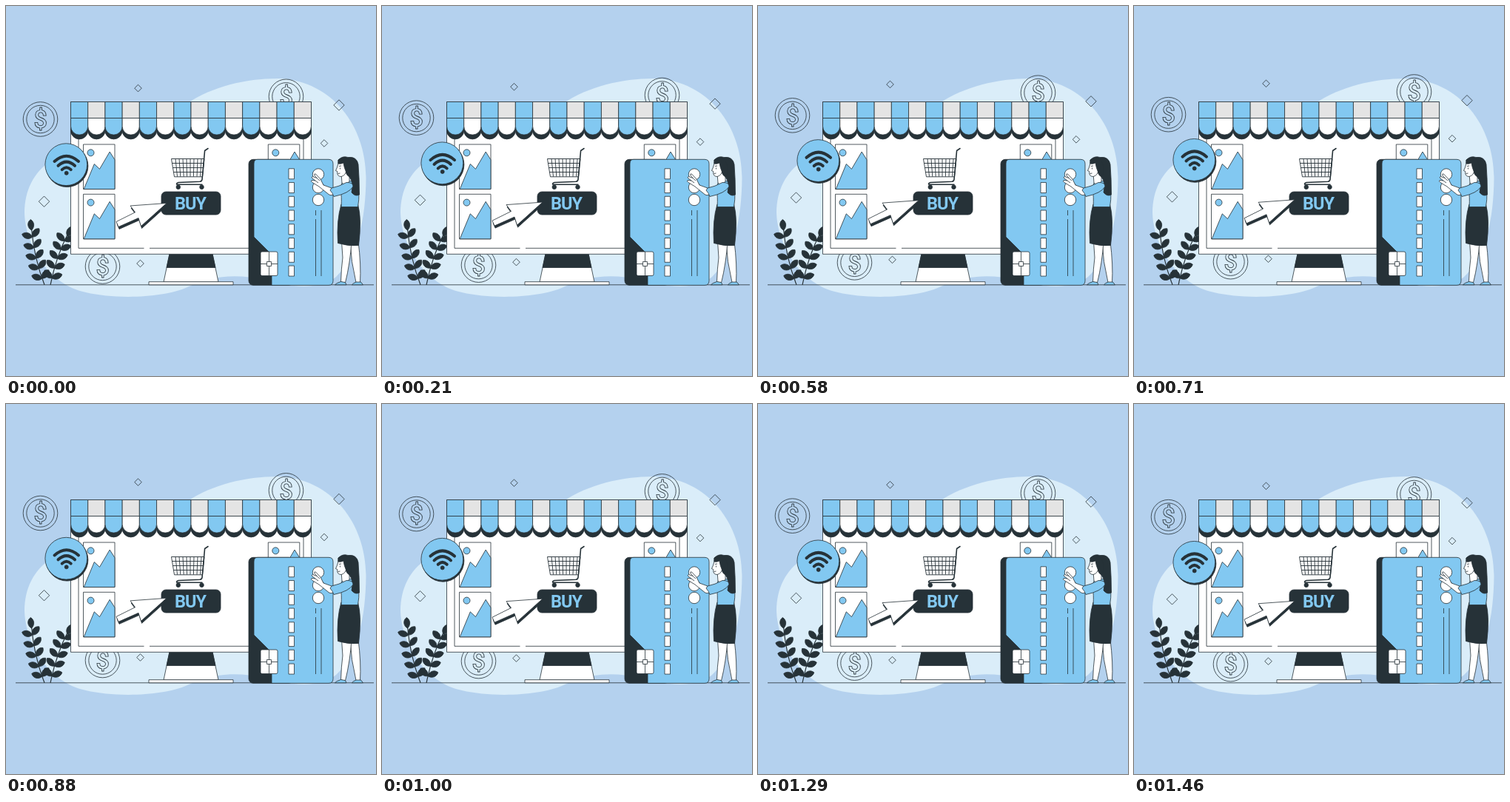
An HTML page that plays this animation: 500x500 px, repeating every 1.5 s.

```html
<!DOCTYPE html>
<html lang="en">
<head>
<meta charset="utf-8">
<title>Online shop</title>
<style>
  html, body { margin: 0; width: 100%; height: 100%; overflow: hidden; background: #b4d1ee; }
  svg { display: block; width: 100%; height: 100%; stroke: #263238; stroke-width: .8; stroke-linejoin: round; fill: none; }
  .blue { fill: #82c8f1; }
  .white { fill: #fff; }
  .grey { fill: #e4e4e4; }
  .dark { fill: #263238; }
  text { font-family: Roboto, "Open Sans", sans-serif; font-stretch: 75%; text-anchor: middle; }
  .buy { font-size: 23.5px; font-weight: 700; letter-spacing: -1px; stroke: none; }
  .dollar { font-size: 33px; font-weight: 500; }
</style>
</head>
<body>
<svg viewBox="0 0 500 500">
  <defs>
    <g id="picture">
      <path class="white" d="M0 0H42.5V60.5H0Z"/>
      <circle class="blue" cx="10" cy="11.3" r="4.5"/>
      <path class="blue" d="M.7 60.5 14.8 26.5 22 33.3 35.7 10 42.5 20.8V60.5Z"/>
    </g>
    <g id="coin">
      <circle r="23.3"/><circle r="18.7"/>
      <text class="dollar" y="11.8">$</text>
    </g>
    <path id="pointer" d="M217 266.5 168 270 174.5 278.8 149 291.5 152 298.5 179 286.5 182.5 297.5Z"/>
  </defs>

  <path fill="#daedf9" stroke="none" d="M25 280C25 249 38 224 60 210C120 172 214 166 246 131C280 108 328 97 372 98C440 103 486 160 486.5 232C486 290 475 338 446 366C425 384 385 380 350 371C310 360 275 366 245 380C215 394 150 397 108 387C55 376 26 320 25 280Z"/>

  <g data-float="1">
    <use href="#coin" x="46.5" y="153"/>
    <use href="#coin" x="378.5" y="122.3"/>
    <use href="#coin" x="130.5" y="352"/>
    <path d="M178.5 106.3l4.8 4.8-4.8 4.8-4.8-4.8zM430 180.7l4.8 4.8-4.8 4.8-4.8-4.8zM181.5 343.2l4.8 4.8-4.8 4.8-4.8-4.8zM450 126.8l7.2 7.2-7.2 7.2-7.2-7.2zM51.5 257l7.2 7.2-7.2 7.2-7.2-7.2z"/>
  </g>

  <path d="M13 376.8H497"/>
  <g id="plant"></g>

  <!-- monitor -->
  <path class="white" d="M221 335H279L287 373H213Z"/>
  <path class="dark" d="M221 335H279L283 353.5H217Z"/>
  <path class="white" d="M193 372.7H307V376.8H193Z"/>
  <path class="white" d="M87.5 129.5H412.5V335.3H87.5Z"/>
  <path d="M98 165V327.3H186.5M194 327.3H402V165"/>
  <g id="awning"></g>
  <use href="#picture" x="104.5" y="187"/>
  <use href="#picture" x="104.5" y="254.3"/>
  <use href="#picture" x="354.3" y="187"/>

  <!-- cart and button -->
  <path d="M223.5 206.5H268L265.5 230.8H227.500ZM224.5 212.5H267.5M225.5 218.5H267M226.5 224.5H266M229 206.5l2.5 24M234 206.5l1.8 24M239 206.5l1.2 24M244 206.5l.6 24M249 206.5v24M254 206.5l-.6 24M259 206.5l-1 24M264 206.5l-1.5 24" stroke-width=".9"/>
  <path d="M273 192.5 268.6 195.5 265 234.5Q264.5 237 262 237.2L233 238.5Q229.5 239.5 231 241.2H265" stroke-width="1.6" stroke-linecap="round"/>
  <circle class="dark" cx="232.8" cy="244.7" r="2.8"/><circle class="dark" cx="264.5" cy="244.7" r="2.8"/>
  <rect class="dark" x="210" y="251" width="80" height="31" rx="6"/>
  <text class="buy blue" x="249" y="275.3">BUY</text>

  <g data-float=".75">
    <use href="#pointer" class="dark" x="1" y="3"/>
    <use href="#pointer" class="white"/>
  </g>

  <g data-float="1">
    <circle class="dark" cx="82.5" cy="216.2" r="28.4"/>
    <circle class="blue" cx="81.3" cy="214.2" r="28.4"/>
    <path d="M65.5 210Q81.7 195.500 98 210M70.5 215.8Q81.7 205.3 93 215.8M75.7 221.2Q81.7 215.3 87.7 221.2" stroke-width="4" stroke-linecap="round"/>
    <circle class="dark" cx="81.7" cy="225.8" r="2.5"/>
  </g>

  <!-- payment card -->
  <rect class="dark" x="328" y="207.3" width="60" height="170" rx="6"/>
  <path class="blue" d="M340 207.3H436Q442 207.3 442 213.3V371.3Q442 377.3 436 377.3H359V336L335 312V213Q335 207.3 340 207.3Z"/>
  <g id="digits"></g>
  <g class="white">
    <circle cx="422" cy="227.5" r="7.7"/><circle cx="422" cy="245" r="7.7"/><circle cx="422" cy="262" r="7.7"/>
  </g>
  <path d="M418.5 276V283M418.5 288V365M426 276V365"/>
  <rect class="white" x="344" y="332" width="23" height="32.5" rx="2"/>
  <path d="M352.5 345.5H358.500V351.5H352.5ZM355.5 332V345.5M355.5 351.5V364.5M344 348.5H352.5M358.5 348.5H367"/>

  <!-- shopper -->
  <path class="white" d="M465 318Q466 345 473 373.5L478.5 374Q480 350 476 318Z"/>
  <path class="white" d="M453.500 318 455 340Q453 355 452.5 373L458.5 374Q465 348 467 318Z"/>
  <path class="blue" d="M452.5 372.5 458.5 373.5 460 376.8H444.500Q446 374.5 452.5 372.5ZM473 373H479.500L482.5 376.8H467.5Q469 374.5 473 373Z"/>
  <path class="dark" d="M453 268H475.500Q481 288 476.5 323.5Q463 325 448.5 320.500Q446.5 290 453 268Z"/>
  <path class="blue" d="M454 239Q464 234 474 239Q479 251 475.5 271.5H453Q454 257 452 248Z"/>
  <path class="white" d="M453 226 454 239Q458 244 464 237V222Z"/>
  <path class="dark" d="M449 208Q455 202 462 204.5Q474 203 476 214Q477.5 234 477.5 255Q472 258 467 252Q470 238 464 231Q458 228 456 212L449 213Z"/>
  <path class="white" d="M449.5 211 447.5 218 445.5 222.5 447.8 223.5Q447 230.5 453 230.5Q459 229 460 222Q461 215 456 210Z"/>
  <path d="M450 216.5 453 216M451.5 218.5V220.5M448.5 226.5 451.5 226"/>
  <path class="dark" d="M449 208Q456 203 463 207Q470 220 465 230Q458 226 456 212Q452 214 449 213Z"/>
  <path class="white" d="M440 246 429 242 425 234 418.5 227Q416 226 417 229L420 232.5 414.5 230.5Q412 231 414 233L418 236 413 235.5Q411.5 237 414 238.5L423 244 436 254.5Q440 257.5 445 253Z"/>
  <path class="blue" d="M440 246Q450 244 460 238.5Q469 238 469 244Q464 253 443 257.5Q441 252 438 249Z"/>
  <path d="M420 232.5 424 236M418 236 422 239"/>
</svg>

<script>
  const $ = id => document.getElementById(id);
  const path = (cls, d) => `<path class="${cls}" d="${d}"/>`;

  // Awning: flat top band, then scallops with a dark edge behind them
  const stripes = 14, left = 87.5, step = 325 / stripes;
  const scallop = (cls, x, y) =>
    path(cls, `M${x} 151.5H${x + step}V${y}a${step / 2} ${step / 2} 0 0 1 ${-step} 0Z`);
  let back = '', front = '';
  for (let i = 0; i < stripes; i++) {
    const x = left + i * step;
    back += scallop('dark', x, 168.3);
    front += path(i % 2 ? 'grey' : 'blue', `M${x} 129.5h${step}v22h${-step}Z`)
           + scallop(i % 2 ? 'white' : 'blue', x, 162.5);
  }
  $('awning').innerHTML = back + front;

  $('digits').innerHTML = Array.from({ length: 8 }, (_, i) =>
    `<rect class="white" x="382" y="${219.8 + i * 18.75}" width="7.5" height="14"/>`).join('');

  // A branch is a quadratic curve with pairs of leaves and one at the tip
  const leaf = (x, y, angle) =>
    path('dark', `M0 0C3-5 11-6 14.500 0C11 5 4 5 0 0Z" transform="translate(${x} ${y}) rotate(${angle})`);
  function branch(x0, y0, x1, y1, x2, y2) {
    const at = (a, b, c, t) => (1 - t) ** 2 * a + 2 * t * (1 - t) * b + t * t * c;
    const lean = Math.atan2(y2 - y0, x2 - x0) * 180 / Math.PI;
    let art = `<path d="M${x0} ${y0}Q${x1} ${y1} ${x2} ${y2}" stroke-width="1.2"/>`;
    for (let i = 0; i < 5; i++) {
      const t = .12 + i * .185, x = at(x0, x1, x2, t), y = at(y0, y1, y2, t);
      art += leaf(x, y, lean - 62) + leaf(x, y, lean + 52);
    }
    return art + leaf(x2, y2 + 2, Math.atan2(y2 - y1, x2 - x1) * 180 / Math.PI);
  }
  $('plant').innerHTML = branch(52, 376.8, 38, 341, 34.5, 301) + branch(60, 376.8, 68, 338, 83, 309);

  // Steady rise and fall
  const period = 1500, rise = 20 / 3;
  const floats = document.querySelectorAll('[data-float]');
  function draw() {
    const t = performance.now() % period / period;
    const y = -rise * (1 - Math.abs(2 * t - 1));
    for (const el of floats) el.setAttribute('transform', `translate(0 ${y * el.dataset.float})`);
    requestAnimationFrame(draw);
  }
  draw();
</script>
</body>
</html>
```
